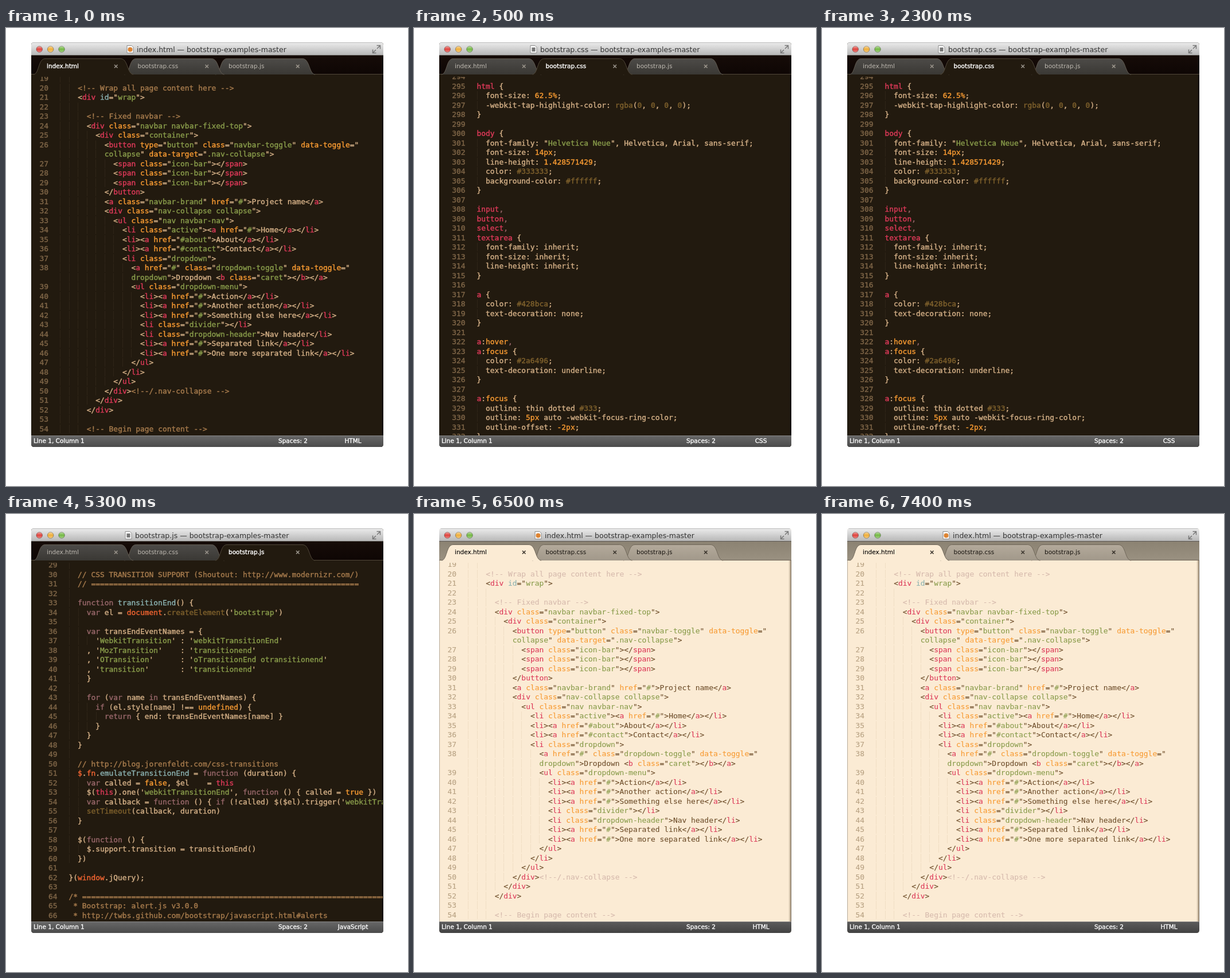
An HTML page for the animation above (8000 ms loop, 701 by 798 pixels).

```html
<!DOCTYPE html>
<html lang="en">
<head>
<meta charset="utf-8">
<title>Editor themes</title>
<style>
html, body { margin: 0; width: 100%; height: 100%; overflow: hidden; background: #fff; }
body {
  --bg: #221a0f; --fg: #d3af86; --num: #7e6547; --guide: #2f2518; --comment: #a57a4c; --bold: .4px;
  --bar1: #160c08; --bar2: #0e0604; --tab1: #4d4b48; --tab2: #3a3834; --edge: #625b51; --rim: #51483a;
  --label: #bdb8b0; --active: #fff; --close: #99938a; --inset: #0006; --foot1: #686868; --foot2: #4b4b4b;
}
body.light {
  --bg: #fbebd4; --fg: #6f4f2c; --num: #b8a283; --guide: #f0dec4; --comment: #d6baad; --bold: .1px;
  --bar1: #8b8272; --bar2: #9a9181; --tab1: #b4aa9b; --tab2: #a1988a; --edge: #70675a; --rim: #70675a;
  --label: #191510; --active: #000; --close: #3d372f; --inset: #5b482f99; --foot1: #5c5c5c; --foot2: #424242;
}
svg, #code, #code div { position: absolute; }
svg, #code { left: 0; top: 0; width: 701px; height: 798px; overflow: hidden; }
svg { font: 10.5px "DejaVu Sans", sans-serif; }
#code {
  clip-path: inset(85px 44px 88px 45px);
  font: 12.93px/16.5px "DejaVu Sans Mono", monospace;
  -webkit-text-stroke: var(--bold);
  color: var(--fg);
}
#code div { white-space: pre; }
#gutter { left: 44px; text-align: right; color: var(--num); }
#code i { font-style: normal; }
#code s { text-decoration: none; background: repeating-linear-gradient(90deg, var(--guide) 0 1px, transparent 1px 2ch); }
.c { color: var(--comment); }
.r { color: #dc3958; }
.o { color: #f79a32; }
.u { color: #f06431; }
.g { color: #889b4a; }
.b { color: #8ab1b0; }
.p { color: #98676a; }
.y { color: #7e602c; }
.tab path { fill: url(#tab); stroke: var(--edge); }
.tab text { fill: var(--label); }
.tab .close { stroke: var(--close); stroke-width: 1.6; }
.tab.on path:first-child { fill: var(--bg); stroke: var(--rim); }
.tab.on text { fill: var(--active); stroke: var(--active); stroke-width: var(--bold); }
</style>
</head>
<body>
<svg viewBox="0 0 701 798">
  <defs>
    <linearGradient id="title" x2="0" y2="1"><stop stop-color="#ececec"/><stop offset="1" stop-color="#b5b5b5"/></linearGradient>
    <linearGradient id="bar" x2="0" y2="1"><stop stop-color="var(--bar1)"/><stop offset="1" stop-color="var(--bar2)"/></linearGradient>
    <linearGradient id="tab" x2="0" y2="1"><stop stop-color="var(--tab1)"/><stop offset="1" stop-color="var(--tab2)"/></linearGradient>
    <linearGradient id="foot" x2="0" y2="1"><stop stop-color="var(--foot1)"/><stop offset="1" stop-color="var(--foot2)"/></linearGradient>
    <linearGradient id="side"><stop stop-color="var(--inset)" stop-opacity="0"/><stop offset="1" stop-color="var(--inset)"/></linearGradient>
    <linearGradient id="gloss" x2="0" y2="1"><stop stop-color="#fff" stop-opacity=".5"/><stop offset=".5" stop-color="#fff" stop-opacity="0"/><stop offset="1" stop-color="#fff" stop-opacity=".35"/></linearGradient>
    <clipPath id="window"><rect x="44" y="25" width="614" height="705" rx="4.5"/></clipPath>
  </defs>
  <g clip-path="url(#window)">
    <rect x="44" y="25" width="614" height="705" fill="var(--bg)"/>
    <rect x="44" y="25" width="614" height="23" fill="url(#title)"/>
    <path d="M44 25.5H658" stroke="#b9b9b9"/>
    <rect x="44" y="47" width="614" height="34" fill="url(#bar)"/>
    <path d="M44 47.5H658" stroke="#5c5853"/>
    <path d="M44 80.5H658" stroke="var(--rim)"/>
    <g id="tabs"></g>
    <rect x="653" y="81" width="5" height="629" fill="url(#side)"/>
    <rect x="44" y="710" width="614" height="20" fill="url(#foot)"/>
    <path d="M44 710.5H658" stroke="#858585"/>
    <path d="M44.5 81V710M657.5 81V710" stroke="#0004"/>
  </g>
  <g id="lights"></g>
  <g id="icon">
    <path d="M.5 .5h8l3 3v10h-11z" fill="#fafafa" stroke="#8b8b8b"/>
    <rect id="sheet" x="3" y="4" width="6" height="7" fill="#777"/>
    <circle id="badge" cx="6" cy="7.5" r="4" fill="#dd8433"/>
  </g>
  <text id="caption" y="41.5" font-size="12.5" fill="#333"></text>
  <path d="M647 36l5-5M646.500 30.500h6v6M645 38l-5 5M645.500 43.500h-6v-6" fill="none" stroke="#777" stroke-width="1.5"/>
  <g fill="#fff" stroke="#fff" stroke-width=".35">
    <text x="48" y="723">Line 1, Column 1</text>
    <text x="475" y="723">Spaces: 2</text>
    <text id="syntax" x="605" y="723" text-anchor="middle"></text>
  </g>
</svg>
<div id="code"><div id="gutter"></div><div id="text"></div></div>

<script>
const markup = {
  file: 'index.html', syntax: 'HTML', tab: 0, titleX: 228, first: 19, edge: 74, top: 80.4,
  rules: /(?<c><!--.*?-->)|(?<=<\/?)(?<r>\w+)|(?<b>\bid)(?==")|(?<o>[\w-]+)(?==")|(?<==")(?<g>[^"]+)/g,
  code: `
    <!-- Wrap all page content here -->
    <div id="wrap">

      <!-- Fixed navbar -->
      <div class="navbar navbar-fixed-top">
        <div class="container">
          <button type="button" class="navbar-toggle" data-toggle="
          collapse" data-target=".nav-collapse">
            <span class="icon-bar"></span>
            <span class="icon-bar"></span>
            <span class="icon-bar"></span>
          </button>
          <a class="navbar-brand" href="#">Project name</a>
          <div class="nav-collapse collapse">
            <ul class="nav navbar-nav">
              <li class="active"><a href="#">Home</a></li>
              <li><a href="#about">About</a></li>
              <li><a href="#contact">Contact</a></li>
              <li class="dropdown">
                <a href="#" class="dropdown-toggle" data-toggle="
                dropdown">Dropdown <b class="caret"></b></a>
                <ul class="dropdown-menu">
                  <li><a href="#">Action</a></li>
                  <li><a href="#">Another action</a></li>
                  <li><a href="#">Something else here</a></li>
                  <li class="divider"></li>
                  <li class="dropdown-header">Nav header</li>
                  <li><a href="#">Separated link</a></li>
                  <li><a href="#">One more separated link</a></li>
                </ul>
              </li>
            </ul>
          </div><!--/.nav-collapse -->
        </div>
      </div>

      <!-- Begin page content -->`
};

const styles = {
  file: 'bootstrap.css', syntax: 'CSS', tab: 1, titleX: 220, first: 294, edge: 89.5, top: 77.4,
  rules: /^(?<r>[a-z]+)|(?<p>,)$|(?<=: ")(?<g>[^"]+)|(?<y>#\w+|rgba|\b0\b)|(?<o>(?<=^a:)\w+|-?\b\d[\d.]*(?:px|%)?)/gm,
  code: `
html {
  font-size: 62.5%;
  -webkit-tap-highlight-color: rgba(0, 0, 0, 0);
}

body {
  font-family: "Helvetica Neue", Helvetica, Arial, sans-serif;
  font-size: 14px;
  line-height: 1.428571429;
  color: #333333;
  background-color: #ffffff;
}

input,
button,
select,
textarea {
  font-family: inherit;
  font-size: inherit;
  line-height: inherit;
}

a {
  color: #428bca;
  text-decoration: none;
}

a:hover,
a:focus {
  color: #2a6496;
  text-decoration: underline;
}

a:focus {
  outline: thin dotted #333;
  outline: 5px auto -webkit-focus-ring-color;
  outline-offset: -2px;
}`
};

const script = {
  file: 'bootstrap.js', syntax: 'JavaScript', tab: 2, titleX: 225, first: 29, edge: 89.5, top: 81.4,
  rules: /(?<c>\/\/.*|\/\*.*|^ \*.*)|(?<g>(?<=')[\w ]+(?='))|(?<p>\b(?:function|var|for|in|if|return)\b)|(?<b>transitionEnd(?=\(\) \{)|emulateTransitionEnd)|(?<u>document|window|\$(?=\.fn)|(?<=\$\.)fn)|(?<y>createElement|setTimeout)|(?<o>undefined|true|false)|(?<r>\bthis\b)/gm,
  code: `
  // CSS TRANSITION SUPPORT (Shoutout: http://www.modernizr.com/)
  // ${'='.repeat(60)}

  function transitionEnd() {
    var el = document.createElement('bootstrap')

    var transEndEventNames = {
      'WebkitTransition' : 'webkitTransitionEnd'
    , 'MozTransition'    : 'transitionend'
    , 'OTransition'      : 'oTransitionEnd otransitionend'
    , 'transition'       : 'transitionend'
    }

    for (var name in transEndEventNames) {
      if (el.style[name] !== undefined) {
        return { end: transEndEventNames[name] }
      }
    }
  }

  // http://blog.jorenfeldt.com/css-transitions
  $.fn.emulateTransitionEnd = function (duration) {
    var called = false, $el    = this
    $(this).one('webkitTransitionEnd', function () { called = true })
    var callback = function () { if (!called) $($el).trigger('webkitTransitionEnd') }
    setTimeout(callback, duration)
  }

  $(function () {
    $.support.transition = transitionEnd()
  })

}(window.jQuery);

/* ${'='.repeat(72)}
 * Bootstrap: alert.js v3.0.0
 * http://twbs.github.com/bootstrap/javascript.html#alerts`
};

const files = [markup, styles, script];
const scenes = [
  { end: 500, file: markup },
  { end: 3500, file: styles },
  { end: 6500, file: script },
  { end: 8000, file: markup, light: true }
];
const $ = id => document.getElementById(id);

// Marks tokens, escapes the text, then turns marks into elements.
function highlight({ code, rules }) {
  return code
    .replace(/^(?=\n+( +))/gm, '$1')
    .replace(rules, (token, ...rest) => {
      const groups = rest.at(-1);
      return `\x01${Object.keys(groups).find(k => groups[k])}${token}\x02`;
    })
    .replace(/&/g, '&amp;').replace(/</g, '&lt;')
    .replace(/^ +/gm, '<s>$&</s>')
    .replace(/\x01(.)/g, '<i class="$1">').replace(/\x02/g, '</i>');
}

// Wrapped rows get no number.
function lineNumbers({ code, first }) {
  const rows = code.split('\n');
  let n = first;
  return rows.map((_, i) => i && rows[i - 1].endsWith('="') ? '' : n++).join('\n');
}

function tab({ file, tab: k }, active) {
  return `<g class="tab ${active ? 'on' : ''}" transform="translate(${158.5 * k})">
    <path d="M48 81C58 80 56 53.500 68 53.500H200C213 53.500 211 80 222 81"/>
    <text x="71" y="70">${file}</text>
    <path class="close" d="M189 64l5.500 5.500m0-5.500l-5.500 5.500"/></g>`;
}

function show({ file, light }) {
  document.body.classList.toggle('light', !!light);
  const others = files.filter(f => f !== file).reverse();
  $('tabs').innerHTML = others.map(f => tab(f)).join('') + tab(file, true);
  $('caption').textContent = `${file.file} — bootstrap-examples-master`;
  $('caption').setAttribute('x', file.titleX);
  $('icon').setAttribute('transform', `translate(${file.titleX - 17.5} 30)`);
  $('badge').style.display = file === markup ? '' : 'none';
  $('sheet').style.display = file === markup ? 'none' : '';
  $('syntax').textContent = file.syntax;
  $('gutter').textContent = lineNumbers(file);
  $('gutter').style.width = `${file.edge - 44}px`;
  $('text').innerHTML = highlight(file);
  $('text').style.left = `${file.edge + 20}px`;
  $('gutter').style.top = $('text').style.top = `${file.top}px`;
}

$('lights').innerHTML = ['#e0443e', '#efae3a', '#74b944'].map((color, i) => {
  const dot = `<circle cx="${58.2 + 19.4 * i}" cy="37" r="5.3"`;
  return `${dot} fill="${color}" stroke="#0005"/>${dot} fill="url(#gloss)"/>`;
}).join('');

let current;
const start = performance.now();
function tick() {
  const t = (performance.now() - start) % 8000;
  const scene = scenes.find(s => t < s.end);
  if (scene !== current) show(current = scene);
  requestAnimationFrame(tick);
}
tick();
</script>
</body>
</html>
```
